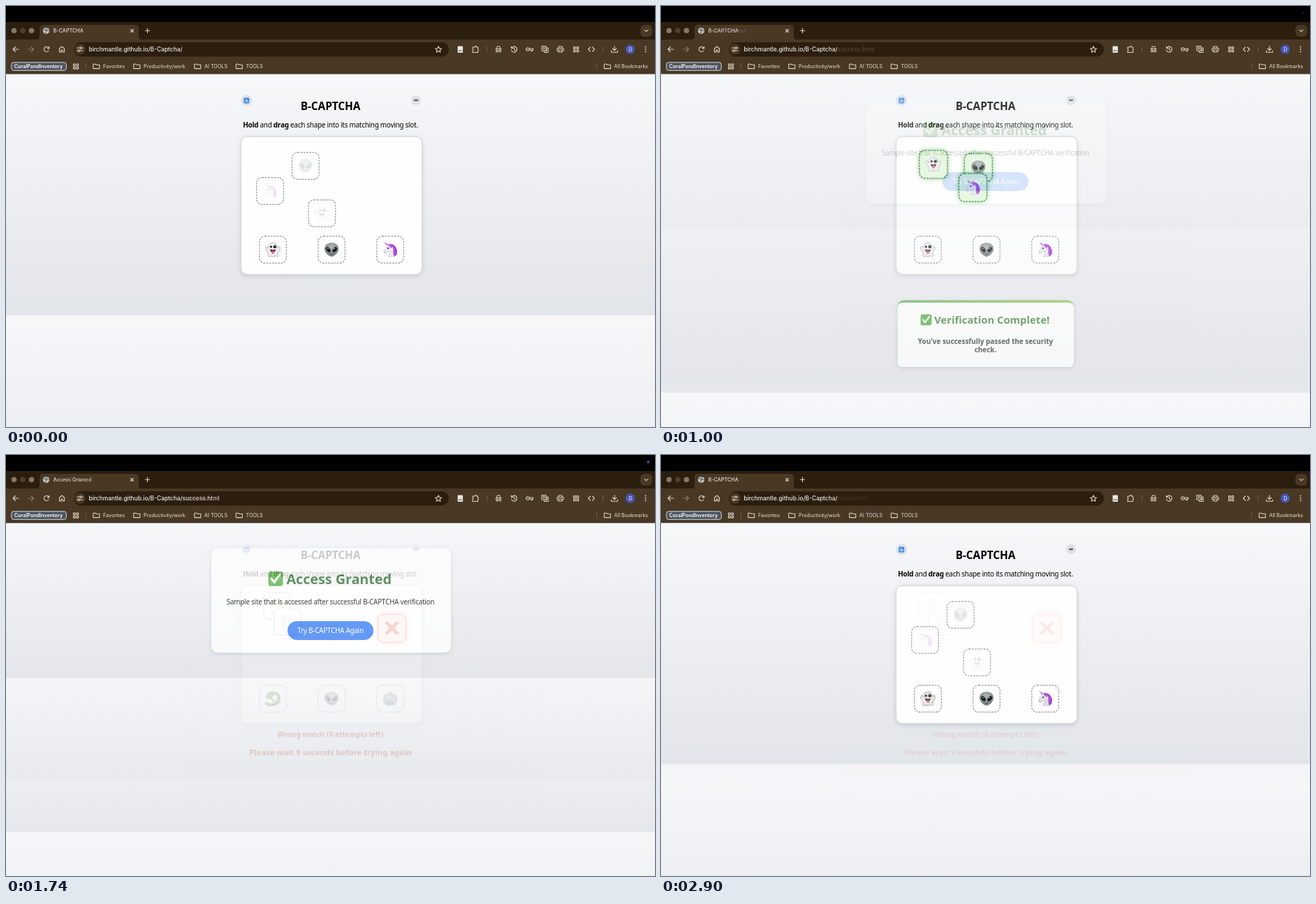
An HTML page for the animation above (2.96 s loop, 929 px wide and 603 px high).

```html
<!DOCTYPE html>
<html lang="en">
<head>
<meta charset="utf-8">
<title>B-CAPTCHA</title>
<style>
  html, body { margin: 0; width: 100%; height: 100%; overflow: hidden; background: #000; }
  svg { display: block; width: 929px; height: 603px; }
  .ui { font: 500 7.2px Inter, sans-serif; fill: #e9e3da; }
  .bookmark { font-weight: 400; }
  .url { font-size: 8.4px; fill: #f1ece4; }
  .icon { fill: none; stroke: #ddd3c4; stroke-width: 1.1; stroke-linecap: round; stroke-linejoin: round; }
  .page { font: 9.9px "Noto Sans", "Open Sans", sans-serif; letter-spacing: -.024em; text-anchor: middle; }
  .bold { font-weight: 700; letter-spacing: 0; }
  .slot { fill: #fff; stroke: #a6a6a8; stroke-width: 1.4; stroke-dasharray: 2.7 1.5; }
  .right { fill: #e2f7dc; stroke: #4b8d49; stroke-width: 1.6; filter: drop-shadow(0 0 3px #7ccb70); }
  .wrong { fill: #ffdcda; stroke: #e8463c; stroke-width: 1.6; filter: drop-shadow(0 0 3px #ff8078); }
  .card { filter: drop-shadow(0 2px 3px #0000001f); }
</style>
</head>
<body>
<svg id="stage" viewBox="0 0 929 603">
  <defs>
    <linearGradient id="bar"><stop stop-color="#70b468"/><stop offset="1" stop-color="#94c864"/></linearGradient>
    <radialGradient id="skin" cy=".3"><stop stop-color="#b4babb"/><stop offset="1" stop-color="#7d8587"/></radialGradient>

    <g id="alien">
      <path d="M0-10C6-10 10-6.500 10-1C10 4 4 10 0 10S-10 4-10-1C-10-6.500-6-10 0-10Z" fill="url(#skin)"/>
      <ellipse cx="-4.600" cy="0" rx="2.600" ry="4" transform="rotate(-38 -4.600 0)" fill="#15181a"/>
      <ellipse cx="4.600" cy="0" rx="2.600" ry="4" transform="rotate(38 4.600 0)" fill="#15181a"/>
      <circle cx="-5.200" cy="-1.500" r=".8" fill="#fff"/><circle cx="4" cy="-1.500" r=".8" fill="#fff"/>
      <path d="M-2 6.300Q0 7.300 2 6.300" fill="none" stroke="#3d4345" stroke-width=".9"/>
    </g>

    <g id="ghost">
      <path d="M0-10C4-10 6-7 6.300-2C7.500-3 7.500-5 9-5C12-4 10 3 6.500 4C7 7 9 9 7 9.500C5 10 4 8 2 9.500C0 11-2 8.500-4 9.500C-6 10.500-8 10-7 8C-6 6-6.300 5-6.500 4C-10 3-12-4-9-5C-7.500-5-7.500-3-6.300-2C-6-7-4-10 0-10Z"
        fill="#edeef1" stroke="#a7a9b0" stroke-width=".8"/>
      <circle cx="-2.700" cy="-4.300" r="1.500" fill="#17181b"/><circle cx="2.700" cy="-4.300" r="2.200" fill="#17181b"/>
      <circle cx="2.200" cy="-4.900" r=".6" fill="#fff"/>
      <path d="M-4-.5Q0 1 4-.5Q3.500 4 0 4T-4-.5Z" fill="#3b2a2e"/>
      <path d="M-1.800 1.500H2V4Q2 6 .1 6T-1.800 4Z" fill="#e8606b"/>
    </g>

    <g id="unicorn">
      <path d="M-4-5L-9-11L-1.500-7Z" fill="#b06ad8"/>
      <path d="M-3-7C2-10 8-6 9-1C11 2 9 4 10 7C8 6 9 9 6 10L1 6Z" fill="#a343d6"/>
      <path d="M-4-6.500L-1-10L0-6C4-5 6 0 4.500 4Q4 7 6 10H-3Q0 6 0 2Q-4 2-6 5C-8 6-10 4-9 2L-5-4Z" fill="#ece7f1" stroke="#b9aec4" stroke-width=".5"/>
      <path d="M-3-7C2-10 4-4 2-2C0-3-1-5-3-7ZM4-5C8-2 7 2 4 4C5 1 4-2 4-5Z" fill="#c34ce0"/>
      <circle cx="-3" cy="-2" r="1.100" fill="#26182b"/>
      <path d="M-9 2.500Q-7 2-6.500 5L-8 5.300Z" fill="#e9a9c4"/>
    </g>

    <g id="dragon" fill="none" stroke-linecap="round" stroke-linejoin="round">
      <path d="M-2-7C5-10 10-4 8 2C6 9-3 10-9 7" stroke="#58853c" stroke-width="4.500"/>
      <path d="M0-6C5-7 7-3 6 1C4 6-2 8-8 7" stroke="#c2cf74" stroke-width="1.700"/>
      <path d="M-10-3L-6-9L0-10L2-5L-2-1L-8 0Z" fill="#75a14a" stroke="#4d7637" stroke-width=".7"/>
      <path d="M-3 1Q1 0 1 4M8 4L10 6" stroke="#6a963f" stroke-width="2"/>
      <circle cx="-4" cy="-6" r="1.200" fill="#f5e7a2"/><circle cx="-4.200" cy="-6" r=".6" fill="#222"/>
    </g>

    <g id="robot">
      <path d="M0-10V-6" stroke="#888" stroke-width="1.500"/><circle cy="-8.500" r="2" fill="#ef9d3c"/>
      <rect x="-10" y="-3" width="20" height="7" rx="2" fill="#c75a4c"/>
      <rect x="-8.500" y="-6.500" width="17" height="16" rx="4.500" fill="#84a6b3" stroke="#5f7d89" stroke-width=".6"/>
      <circle cx="-3.800" cy="-1.500" r="2.500" fill="#f5f2e8"/><circle cx="3.800" cy="-1.500" r="2.500" fill="#f5f2e8"/>
      <circle cx="-3.800" cy="-1.500" r="1.400" fill="#c33d32"/><circle cx="3.800" cy="-1.500" r="1.400" fill="#c33d32"/>
      <path d="M0 .5L1.200 3H-1.200Z" fill="#d6533f"/>
      <rect x="-5" y="4.300" width="10" height="3" rx="1" fill="#35444b"/><path d="M-4 5.800H4" stroke="#eee" stroke-dasharray="1.500 .6"/>
    </g>

    <g id="cross"><path d="M-8.500-8.500L8.500 8.500M8.500-8.500L-8.500 8.500" stroke="#e0392f" stroke-width="5"/></g>
    <g id="check">
      <rect x="-10" y="-10" width="20" height="20" rx="3" fill="#63b94f" stroke="#4f9f40" stroke-width=".7"/>
      <path d="M-6 0L-2 5L6-6" fill="none" stroke="#fff" stroke-width="3" stroke-linecap="round"/>
    </g>
  </defs>
  <g id="chrome"></g>
  <g id="scenes"></g>
</svg>
<script>
const HOLD = 200, STEP = 60, STEPS = 10, PART = 740;
const DARK = '#2b1e0f', BROWN = '#483824';
const byId = id => document.getElementById(id);

const rect = (x, y, w, h, fill, rx = 0, more = '') =>
  `<rect x="${x}" y="${y}" width="${w}" height="${h}" rx="${rx}" fill="${fill}" ${more}/>`;
const circle = (x, y, r, fill) => `<circle cx="${x}" cy="${y}" r="${r}" fill="${fill}"/>`;
const text = (x, y, s, cls, style = '') => `<text x="${x}" y="${y}" class="${cls}" style="${style}">${s}</text>`;
const line = (y, s, size, color = '#111') => text(464.5, y, s, 'page bold', `font-size:${size}px;fill:${color}`);
const para = (y, s, color = '#151515') => text(464.5, y, s, 'page', `fill:${color}`);
const icon = (x, y, d, more = '') => `<path class="icon" transform="translate(${x} ${y})" d="${d}" ${more}/>`;
const emoji = (name, x, y, size = 20, opacity = 1) =>
  `<use href="#${name}" transform="translate(${x} ${y}) scale(${size / 20})" opacity="${opacity}"/>`;

function slot(name, x, y, kind = '', opacity = 1) {
  const size = kind ? 40 : 38.6;
  return `<rect class="slot ${kind}" x="${x - size / 2}" y="${y - size / 2}" width="${size}" height="${size}" rx="8"/>` +
    emoji(name, x, y, 20, opacity);
}
const ghostly = (name, x, y) => slot(name, x, y, '', .14);

function drawChrome() {
  const folder = 'M-4.500-3H-1L0-2H4.500V3.300H-4.500Z';
  const tiles = 'M-3.500-3.500h2.600v2.600h-2.600zM1-3.500h2.600v2.600h-2.600zM-3.500 1h2.600v2.600h-2.600zM1 1h2.600v2.600h-2.600z';
  const bookmarks = [[139, 'Favorites'], [197, 'Productivity/work'], [284, 'AI TOOLS'], [343.5, 'TOOLS'], [870.5, 'All Bookmarks']];
  const icons = [
    [14, 'M4 0H-4M-.5-3.500L-4 0L-.5 3.500'],
    [58, 'M3.500-1A3.600 3.600 0 1 0 3 2M3.700-3.800V-1H1'],
    [80, 'M-3.500 4V-1L0-4L3.500-1V4H1V1H-1V4Z'],
    [106, 'M-4-2H0M3-2H4M-4 2H-3M0 2H4M0-2a1.300 1.300 0 1 0 2.600 0a1.300 1.300 0 1 0-2.600 0M-3 2a1.300 1.300 0 1 0 2.600 0a1.300 1.300 0 1 0-2.600 0'],
    [619, 'M0-4.300L1.300-1.300L4.500-1L2 1.200L2.800 4.300L0 2.600L-2.800 4.300L-2 1.200L-4.500-1L-1.300-1.300Z'],
    [672, 'M-4-3H-1A1.400 1.400 0 0 1 1.800-3H3.500V-.5A1.400 1.400 0 0 1 3.500 2V4.500H-4V2A1.500 1.500 0 0 0-4-.7Z'],
    [705, 'M-4.300-.5H4.300M-2.500-1L-1.800-4H1.800L2.500-1M-3.500 2.500a1.400 1.400 0 1 0 2.800 0a1.400 1.400 0 1 0-2.800 0M.7 2.500a1.400 1.400 0 1 0 2.800 0a1.400 1.400 0 1 0-2.800 0'],
    [727.5, 'M-3.500-2A4 4 0 1 1-4 1M-4-4V-1.500H-1.500M0-2V.5L2 1.500'],
    [749.5, 'M-5 0a2.300 2.300 0 1 0 4.600 0a2.300 2.300 0 1 0-4.600 0M0-1H5V1H4V2.500H2V1H0M-3 0H-2.500'],
    [771.5, 'M-4.500-4.500H1.500V2H-4.500ZM1.500-2H4.500V4.500H-1L-1.500 2M-3-2H0M-1.500-3V0M1.500 3L3 0'],
    [793.500, 'M-2.500-1.500V-4H2.500V-1.500M-2.500 2H-4.500V-1.500H4.500V2H2.500M-2.500 1H2.500V4H-2.500Z'],
    [816, tiles],
    [838, 'M-1.500-3L-4.500 0L-1.500 3M1.500-3L4.500 0L1.500 3'],
    [871, 'M0-4.500V1.500M-2.700-1L0 1.700L2.700-1M-4.500 2V4.300H4.500V2'],
  ];
  let s = rect(0, 0, 929, 23, '#000') + rect(0, 23, 929, 26, DARK) + rect(0, 48, 929, 50, BROWN) +
    `<path d="M44 48Q48 48 48 43V32Q48 27 53 27H185Q190 27 190 32V43Q190 48 194 48Z" fill="${BROWN}"/>` +
    [11.5, 24, 36.5].map((x, i) => circle(x, 35.3, 3.8, i === 1 ? '#4d402f' : '#83786a')).join('') +
    circle(57.5, 35.5, 4.6, '#c4c7c9') +
    icon(57.5, 35.5, 'M-3.500-2L-1-1L0 1L-1 4M1-4L0-2L2 0L4-.5', 'style="stroke:#5c5a55"') +
    icon(180.5, 35.5, 'M-2-2L2 2M2-2L-2 2') + icon(202.5, 35.3, 'M-3.200 0H3.200M0-3.200V3.200') +
    rect(908, 27, 17, 17, BROWN, 6) + icon(916.5, 35.5, 'M-2.500-1.200L0 1.200L2.500-1.200') +
    rect(97, 52, 537, 20.5, DARK, 10.2) + circle(106, 62, 7.8, BROWN) +
    icon(35.5, 62, 'M-4 0H4M.5-3.500L4 0L.5 3.500', 'opacity=".45"');
  s += icons.map(([x, d]) => icon(x, 62, d)).join('');
  s += rect(646.5, 57.5, 7.5, 9.5, '#e9e8e4', 1) + rect(647.5, 63, 5.5, 2.2, '#9aa0a8') +
    circle(893.5, 62, 6.6, '#4856b8') + text(891.2, 64.5, 'D', 'ui') +
    [-3.5, 0, 3.5].map(d => circle(915.5, 62 + d, 1, '#ddd3c4')).join('') +
    [[688.5, 58], [854.5, 58], [114.5, 82], [845.5, 82]].map(([x, y]) => rect(x - .5, y, 1, 8.5, '#6d5c47')).join('') +
    rect(7.8, 80.8, 78.500, 11.500, '#4c5560', 3, 'stroke="#d5dade" stroke-width="1"') +
    text(11.8, 89.1, 'CoralPondInventory', 'ui', 'font-weight:600;fill:#fff') + icon(100, 86.5, tiles);
  s += bookmarks.map(([x, name]) => icon(x - 9.7, 86.3, folder) + text(x, 89.1, name, 'ui bookmark')).join('');
  byId('chrome').innerHTML = s;
}

// Every scene is opaque where it differs, so stacking with opacity is a true cross-fade.
function scene(id, height, title, path, content, dot = '') {
  return `<g id="scene${id}">
    <linearGradient id="sky${id}" gradientUnits="userSpaceOnUse" spreadMethod="repeat" x1="0" y1="98" x2="0" y2="${98 + height}">
      <stop stop-color="#f6f7f9"/><stop offset="1" stop-color="#e2e5e9"/></linearGradient>
    ${rect(0, 97.5, 929, 505.5, `url(#sky${id})`)}
    ${rect(66, 29, 106, 14, BROWN)}${text(67.7, 38.2, title, 'ui')}
    ${rect(116, 54, 400, 16, DARK)}${text(118.5, 65.2, 'birchmantle.github.io/B-Captcha/' + path, 'ui url')}
    ${rect(910, 0, 19, 20, '#000')}${dot}${content}</g>`;
}

function captcha(shapes, slots) {
  return circle(344.3, 135.3, 8, '#dde2e8') + rect(340.3, 131.500, 8, 8, '#3e86e0', 1.5) +
    `<path d="M344 133v2.600h2l.8 2M343 134.700a1.700 1.700 0 1 0 2.300 2.500" fill="none" stroke="#fff" stroke-width=".8"/>` +
    circle(587, 135, 7, '#dde0e3') + rect(584.5, 133.7, 2.2, 2.5, '#3d4043', .6) + rect(587.2, 133.7, 2.2, 2.5, '#3d4043', .6) +
    line(149.3, 'B-CAPTCHA', 15.3, '#000') +
    para(174.3, '<tspan font-weight="700">Hold</tspan> and <tspan font-weight="700">drag</tspan> each shape into its matching moving slot.', '#000') +
    rect(336.5, 187, 259, 197.5, '#fefefe', 9, 'class="card" stroke="#d6d9dd" stroke-width="1.3"') +
    slots + shapes.map((name, i) => slot(name, 382 + i * 84, 349)).join('');
}

function drawScenes() {
  const trio = ['ghost', 'alien', 'unicorn'];
  const start = captcha(trio,
    ghostly('alien', 428.8, 229) + ghostly('unicorn', 378, 265) + ghostly('ghost', 452.3, 297));
  const solved = captcha(trio,
    slot('ghost', 390, 226.7, 'right') + slot('alien', 454.3, 231.3, 'right') + slot('unicorn', 446.5, 260, 'right')) +
    rect(338.500, 421.5, 252.5, 95.5, 'url(#bar)', 9, 'class="card"') + rect(338.5, 424.7, 252.5, 92.3, '#fdfdfd', 7) +
    emoji('check', 379.5, 449.5, 15) +
    text(473.7, 455, 'Verification Complete!', 'page bold', 'font-size:14.8px;fill:#56944e') +
    line(484, "You've successfully passed the security", 9.95, '#484848') + line(496, 'check.', 9.95, '#484848');
  const granted = rect(294, 133.5, 343, 149.5, '#fefefe', 9, 'class="card"') +
    emoji('check', 386, 177.2, 20) +
    text(476.7, 184.6, 'Access Granted', 'page bold', 'font-size:19.7px;fill:#3a7a3c') +
    para(213.7, 'Sample site that is accessed after successful B-CAPTCHA verification') +
    rect(403, 238, 123, 27, '#3d80f5', 13.5) + para(255.2, 'Try B-CAPTCHA Again', '#fff');
  const failed = captcha(['dragon', 'alien', 'robot'],
    ghostly('dragon', 388, 216) + ghostly('alien', 402.8, 238.7) + slot('cross', 552.4, 248, 'wrong')) +
    line(403.9, 'Wrong match (0 attempts left)', 10.05, '#b0281f') +
    line(429.8, 'Please wait 9 seconds before trying again', 11.25, '#b0281f');

  byId('scenes').innerHTML =
    scene(0, 345, 'B-CAPTCHA', '', start) +
    scene(1, 456, 'B-CAPTCHA', '', solved) +
    scene(2, 221, 'Access Granted', 'success.html', granted, circle(919.3, 10, 2, '#5a50c8')) +
    scene(3, 367.5, 'B-CAPTCHA', 'index.html', failed);
}

drawChrome();
drawScenes();
const layers = [0, 1, 2, 3].map(i => byId('scene' + i));
let topLayer = null;

function render(now) {
  const time = now % (PART * layers.length);
  const current = Math.floor(time / PART), next = (current + 1) % layers.length;
  const local = time - current * PART;
  const mix = local < HOLD ? 0 : (Math.floor((local - HOLD) / STEP) + 1) / STEPS;
  if (topLayer !== next) byId('scenes').append(layers[topLayer = next]);
  layers.forEach((layer, i) => {
    const opacity = i === current ? 1 : i === next ? mix : 0;
    layer.style.display = opacity ? '' : 'none';
    layer.style.opacity = opacity;
  });
}

const begin = performance.now();
function tick() {
  render(performance.now() - begin);
  requestAnimationFrame(tick);
}
tick();
</script>
</body>
</html>
```
